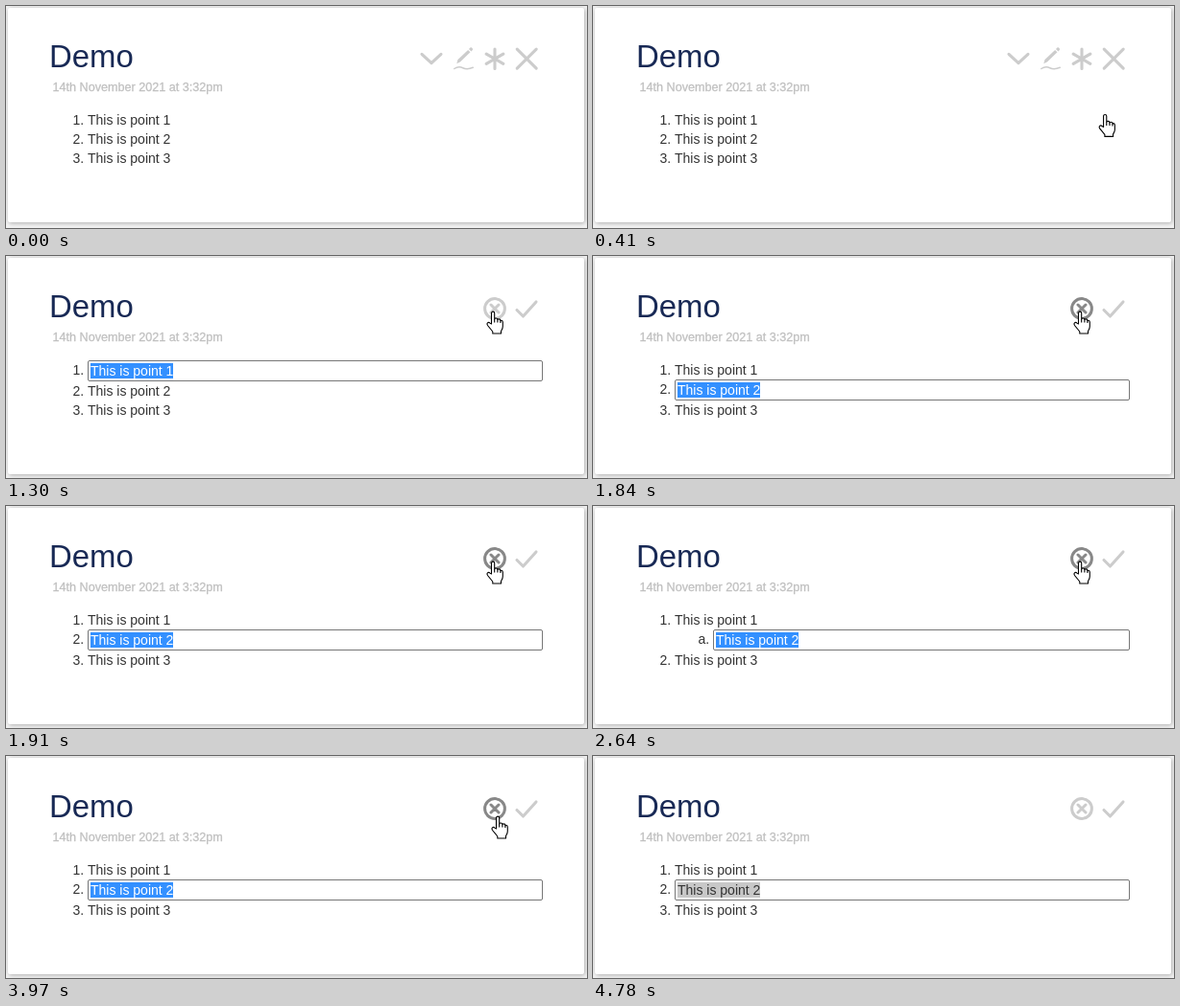
Recreate the animation shown at these times as an HTML page. Size 605x232 px, loop 4.98 s.

```html
<!DOCTYPE html>
<html lang="en">
<head>
<meta charset="utf-8">
<title>Demo</title>
<style>
  html, body { margin: 0; width: 100%; height: 100%; overflow: hidden; background: #f4f4f4; }
  #card { position: absolute; left: 2px; top: 2px; width: 600px; background: #fff;
    border-radius: 2px; box-shadow: 1px 1px 5px rgba(0, 0, 0, .3); }
  svg { position: absolute; left: 0; top: 0; }
  text { font: 14px "Liberation Sans", Arial, sans-serif; fill: #333; white-space: pre; }
  #title { font-size: 32.9px; fill: #182955; }
  #date { font-size: 12.6px; fill: #c0c0c0; stroke: #c0c0c0; stroke-width: .3; }
  .icon { fill: none; stroke: #ccc; stroke-width: 3.1; stroke-linecap: round; stroke-linejoin: round; }
</style>
</head>
<body>
<div id="card"></div>
<svg width="605" height="232" viewBox="0 0 605 232">
  <text id="title" x="45" y="64">Demo</text>
  <text id="date" x="48.6" y="89">14th November 2021 at 3:32pm</text>

  <g id="viewTools" class="icon">
    <path d="M433 50.3l10 9.4 10-9.4"/>
    <g stroke="none" fill="#ccc">
      <path d="M469.3 60.3l1.2-4.2 10.6-10.2 2.4 2.4-10.6 10.2z"/>
      <path d="M482 45l1.4-1.4q.9-.6 1.6 0l.8.8q.6.8 0 1.600l-1.400 1.400z"/>
    </g>
    <path stroke-width="1.5" d="M466.800 65.500c3-2 6-2.200 9-.8s6.500 1.200 10.500-.4"/>
    <path id="star" d="M509 45v20.400M500.200 50.100l17.600 10.200M517.800 50.100l-17.600 10.200"/>
    <path d="M532.200 45.200l20 20M552.200 45.200l-20 20"/>
  </g>

  <g id="editTools" class="icon">
    <g id="cancel" stroke-width="3">
      <circle cx="509" cy="55" r="10.400"/>
      <path d="M505 51l8 8M513 51l-8 8"/>
    </g>
    <path d="M532 56.500l6.500 6.500 13.500-15"/>
  </g>

  <g id="list"></g>

  <g id="hand" fill="#fff" stroke="#000" stroke-width="1.1" stroke-linejoin="round">
    <path d="M5.500 13.500V2.200a1.600 1.600 0 0 1 3.200 0V8.500q.2-1 1.500-1 1.600 0 1.700 1.500 .4-.7 1.400-.6 1.500.1 1.600 1.700 .3-.5 1-.4 1.400.2 1.400 1.800V16q0 2-1.200 4l-.6 1v2.500H6.800v-2L1.500 15q-1-1.600 0-2.600 1.200-1 2.500.2z"/>
    <path fill="none" d="M8.700 8.500V12M11.900 9v3M14.900 10v2.500"/>
  </g>
  <circle id="click" cx="505" cy="58" r="12" fill="#ff0" opacity=".47"/>
</svg>
<script>
const LOOP = 4980, STEP = 70;
const $ = id => document.getElementById(id);
const clamp = v => Math.max(0, Math.min(1, v));
const show = (id, on) => $(id).setAttribute('display', on ? 'inline' : 'none');

// Number of whole steps since a moment
const steps = (t, from) => Math.floor((t - from) / STEP);

function tint(id, k) {
  const c = Math.round(204 - 68 * clamp(k));
  $(id).setAttribute('stroke', `rgb(${c},${c},${c})`);
}

const label = (x, y, s, fill = '#333') => `<text x="${x}" y="${y}" style="fill:${fill}">${s}</text>`;

function field(x, y, s, focused) {
  return `<rect x="${x + .5}" y="${y + .5}" width="${558 - x}" height="21" rx="1.5" fill="#fff" stroke="#767676"/>` +
    `<rect x="${x + 3}" y="${y + 3}" width="86" height="16" fill="${focused ? '#3390ff' : '#c8c8c8'}"/>` +
    label(x + 3, y + 16, s, focused ? '#fff' : '#333');
}

// active: item being edited, or -1; nested: the second item is indented
function listMarkup(active, nested, focused) {
  const marks = nested ? ['1.', 'a.', '2.'] : ['1.', '2.', '3.'];
  let y = 124, out = '';
  marks.forEach((mark, i) => {
    const x = nested && i === 1 ? 125 : 85;
    const s = `This is point ${i + 1}`;
    out += label(x - 15.6, y, mark);
    out += i === active ? field(x, y - 15, s, focused) : label(x, y, s);
    y += i === active ? 22 : 20;
  });
  return out;
}

function handAt(t) {
  if (t < 200 || t >= 4180) return null;
  if (t < 760) {
    const u = Math.pow(1 - steps(t, 200) / 7, 1.3);
    return [500 + 54 * u, 57.5 + 165 * Math.pow(u, 1.5)];
  }
  if (t < 3970) return [500, 57.5];
  const n = steps(t, 3970), e = n * n / 4;
  return [505 + 84 * e, 62.5 + 113 * e];
}

let shown = '';
function draw(t) {
  const editing = t >= 1230;
  $('card').style.height = (editing ? 226 : 224) + 'px';
  show('viewTools', !editing);
  show('editTools', editing);
  show('click', t >= 1030 && t < 1230);

  tint('star', steps(t, 620) / 2);
  tint('cancel', t < 3970 ? steps(t, 1300) / 2 : 1 - steps(t, 3970) / 3);

  const active = !editing ? -1 : t < 1840 ? 0 : 1;
  const markup = listMarkup(active, t >= 2640 && t < 3300, t < 4780);
  if (markup !== shown) $('list').innerHTML = shown = markup;

  const p = handAt(t);
  show('hand', p);
  if (p) $('hand').setAttribute('transform', `translate(${p[0]} ${p[1]})`);
}

const start = performance.now();
function tick() {
  draw((performance.now() - start) % LOOP);
  requestAnimationFrame(tick);
}
tick();
</script>
</body>
</html>
```
